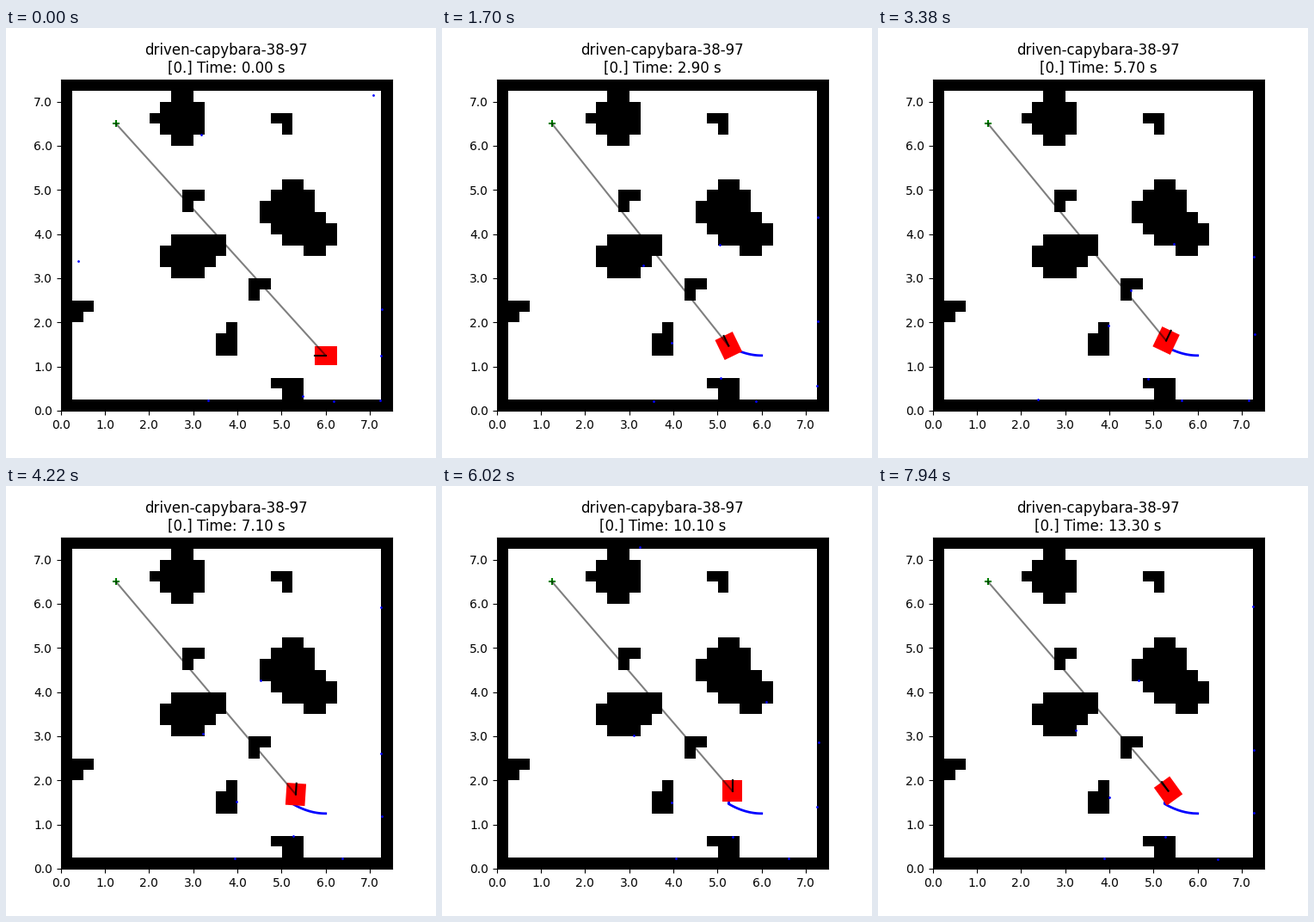
Animation of 500 by 500 pixels, one loop 8 s. Source, as a matplotlib script:

```python
import numpy as np
import matplotlib.pyplot as plt
from matplotlib.animation import FuncAnimation

CELL, N = 0.25, 30
SIZE = CELL * N
GOAL = (1.25, 6.5)
LENGTH, WIDTH = 0.5, 0.44
MAX_RANGE, RAY_STEP = 6.0, 0.05
RAYS = np.radians(180 + 39.8 * np.arange(-4, 5))

# Round obstacles as (x, y, radius), in cells
DISCS = [(10.7, 26.5, 2.26), (20.8, 18, 2.67), (23.1, 16, 1.8),
         (11.5, 14, 2.2), (14, 15, 0.9), (15.1, 6.4, 1.2), (20.6, 2.1, 1.2),
         (20.2, 26.2, 0.85), (11.8, 19.2, 0.85), (17.8, 11.2, 0.85),
         (1.8, 9.2, 0.85)]

# Heading in degrees at the turning points
TURNS = {0: 180, 9: 161.6, 29: 116, 48: 61, 56: 63, 71: 86.3, 85: 64,
         101: 90, 125: 106, 133: 125.9}


def make_grid():
    """Occupied cells, bottom row first: a wall plus rasterised discs."""
    row, col = np.indices((N, N))
    grid = (np.minimum(row, col) == 0) | (np.maximum(row, col) == N - 1)
    for x, y, r in DISCS:
        grid |= np.hypot(col + 0.5 - x, row + 0.5 - y) < r
    return grid


def ease(t, start, end):
    u = np.clip((t - start) / (end - start), 0, 1)
    return u * u * (3 - 2 * u)


def drive(t):
    """Brake along a parabola, then creep upwards."""
    ahead = 0.75 * (1 - (1 - np.minimum(t / 28, 1)) ** 2)
    x = 6 - ahead + 0.083 * ease(t, 37, 81)
    y = 1.25 + 0.39 * ahead ** 2 + 0.292 * ease(t, 30, 92)
    return x, y


grid = make_grid()
steps = np.arange(134)
xs, ys = drive(steps)
angles = np.radians(np.interp(steps, list(TURNS), list(TURNS.values())))
reach = np.arange(0, MAX_RANGE + RAY_STEP / 2, RAY_STEP)


def scan(x, y, heading):
    """March each ray until it enters an occupied cell or runs out."""
    a = (heading + RAYS)[:, None]
    pts = np.stack([x + reach * np.cos(a), y + reach * np.sin(a)], axis=-1)
    col, row = np.clip((pts / CELL + 1e-9).astype(int), 0, N - 1).T
    hit = grid[row, col].T
    hit[:, -1] = True
    return pts[np.arange(len(RAYS)), hit.argmax(axis=1)]


def corners(x, y, heading):
    c, s = np.cos(heading), np.sin(heading)
    box = np.array([(1, 1), (1, -1), (-1, -1), (-1, 1)]) * (LENGTH / 2, WIDTH / 2)
    return box @ np.array([(c, s), (-s, c)]) + (x, y)


fig, ax = plt.subplots(figsize=(5, 5), dpi=100)
ax.imshow(grid, cmap="binary", vmin=0, vmax=1, origin="lower",
          extent=(0, SIZE, 0, SIZE), interpolation="nearest")
ticks = np.arange(8)
labels = [f"{t:.1f}" for t in ticks]
ax.set_xticks(ticks, labels)
ax.set_yticks(ticks, labels)
title = ax.set_title("")

trail, = ax.plot([], [], color="blue", lw=2, zorder=0.5)
robot = plt.Polygon(corners(xs[0], ys[0], angles[0]), fc="red", ec="none", zorder=1)
ax.add_patch(robot)
sight, = ax.plot([], [], color="black", alpha=0.5, lw=1.5)
nose, = ax.plot([], [], color="black", lw=1.5)
ax.scatter(*GOAL, marker="+", color="green")
hits = ax.scatter([], [], s=1, color="blue")
ax.set(xlim=(0, SIZE), ylim=(0, SIZE))


def draw(frame):
    # Steps alternate between 20 ms and 100 ms
    n = 2 * (frame // 6) + (frame % 6 > 0)
    x, y, a = xs[n], ys[n], angles[n]
    title.set_text(f"driven-capybara-38-97\n[0.] Time: {n / 10:.2f} s")
    trail.set_data(xs[:n + 1], ys[:n + 1])
    robot.set_xy(corners(x, y, a))
    sight.set_data([x, GOAL[0]], [y, GOAL[1]])
    nose.set_data([x, x + LENGTH / 2 * np.cos(a)], [y, y + LENGTH / 2 * np.sin(a)])
    hits.set_offsets(scan(x, y, a))
    return title, trail, robot, sight, nose, hits


anim = FuncAnimation(fig, draw, frames=400, interval=20, repeat=True,
                     repeat_delay=0, init_func=lambda: draw(0))
plt.show()
```
